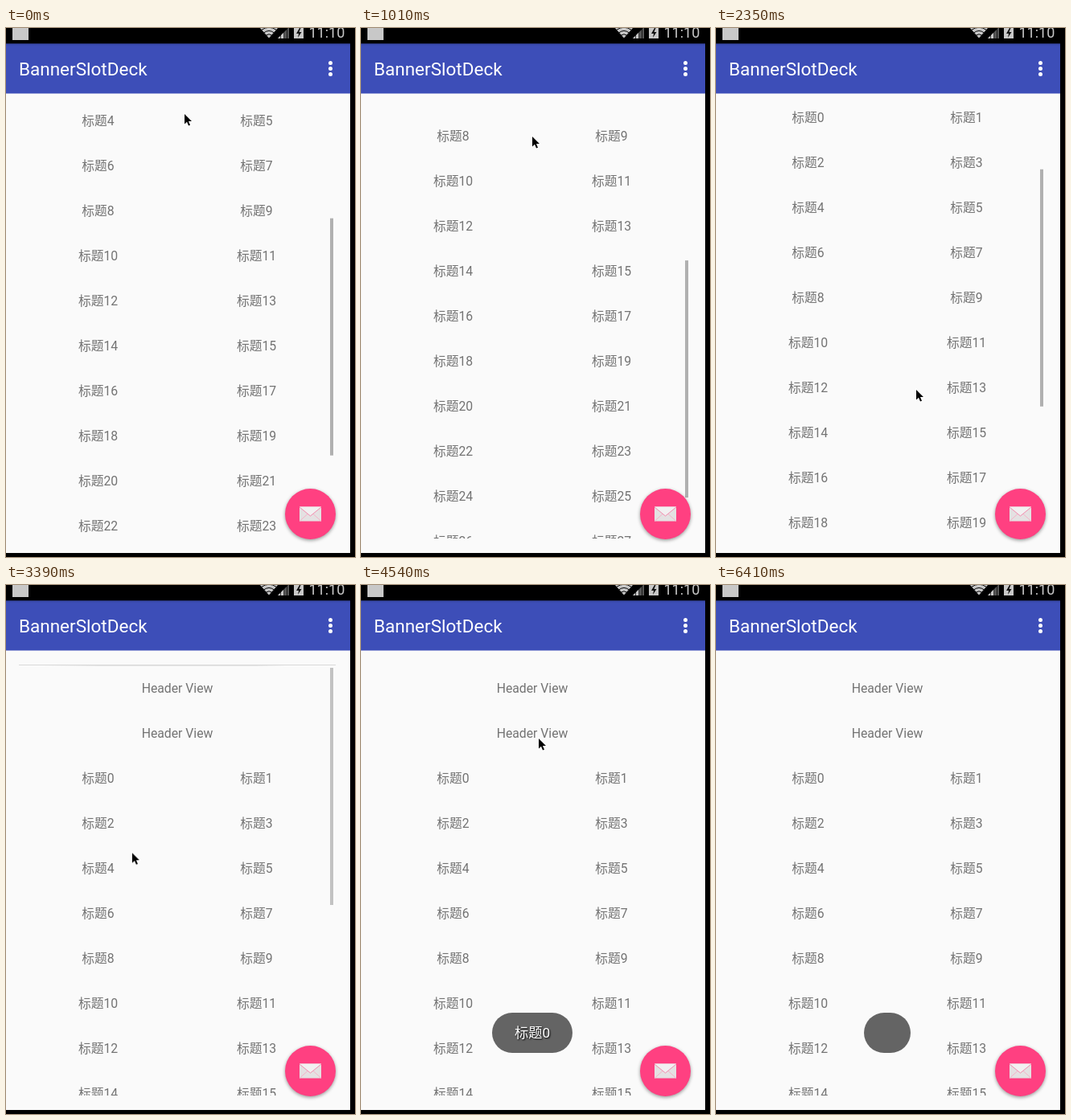
These frames come from a looping animation (434 by 658 pixels, 6.53 s). An HTML page:

```html
<!DOCTYPE html>
<html lang="zh-CN">
<head>
<meta charset="utf-8">
<title>Grid scroll</title>
<style>
@property --s { syntax: "<number>"; inherits: true; initial-value: 0; }

html, body { margin: 0; width: 100%; height: 100%; overflow: hidden; background: #000; }
body { font: 15.75px Roboto, "Noto Sans CJK SC", "Noto Sans CJK JP", sans-serif; color: #737373; }
#stage { position: relative; width: 434px; height: 658px; overflow: hidden; --loop: 6530ms linear infinite; }
#stage div, #stage svg { position: absolute; }

#page { left: 0; top: 19px; width: 428px; height: 634px; background: #fafafa; }
#appbar {
  left: 0; top: 19px; width: 412px; height: 63px; padding-left: 16px;
  background: linear-gradient(#232d6a 1px, #3848aa 1px, #3d4eb8 4px 62px, #9ca4d9 62px);
  color: #fff; font-size: 22.5px; line-height: 64px;
}
#status, #icons { left: 0; top: 0; }

#list { left: 16px; top: 99px; width: 394px; height: 536px; overflow: hidden; animation: scroll var(--loop); }
#rows { left: 0; top: 2px; width: 100%; transform: translateY(calc(var(--s) * -1px)); }
#rows div { height: 56px; line-height: 56px; text-align: center; white-space: nowrap; }
#bar {
  left: 386.5px; top: 4px; width: 4px; height: 295px; background: #b0b0b0;
  transform: translateY(calc(var(--s) * .564px)); animation: bar-fade var(--loop);
}
#glow {
  left: 0; top: 0; width: 100%; height: 2px; opacity: 0;
  background: linear-gradient(#d9d9d9, #d9d9d9) 0 0 / 100% 1px no-repeat,
    linear-gradient(90deg, transparent 8%, #e6e6e6 25% 75%, transparent 84%);
  animation: glow var(--loop);
}
.press { background: #d6d6d6; opacity: 0; height: 56px; }
#press-cell { left: 0; top: 113px; width: 197px; animation: press-cell var(--loop); }
#press-head { left: 0; top: 57px; width: 394px; animation: press-head var(--loop); }

.toast {
  top: 532px; height: 50px; border-radius: 25px; background: #646464; opacity: 0;
  color: #fff; font-size: 17.25px; line-height: 51px; text-align: center; text-shadow: 1px 1px 2px #000;
}
#toast { left: 163px; width: 100px; animation: toast var(--loop); }
#blank { left: 184px; width: 58px; animation: blank var(--loop); }

#fab {
  left: 347px; top: 572.5px; width: 63px; height: 63px; border-radius: 50%;
  background: #ff4081; box-shadow: 0 1.5px 4px rgba(0, 0, 0, .4);
}
#cursor { left: 0; top: 0; overflow: visible; animation: move var(--loop); }

@keyframes scroll {
  0%, .76% { --s: 237; }
  .77% { --s: 266; }
  1.9% { --s: 298; }
  3.06%, 11.5% { --s: 320; }
  15%, 17.9% { --s: 330; }
  19.6%, 22.36% { --s: 322; }
  25.88%, 29.56% { --s: 151; }
  32.31%, 41.35% { --s: 129; }
  43.4% { --s: 75; }
  45.4%, 100% { --s: 0; }
}
@keyframes bar-fade {
  0%, 51% { opacity: 1; }
  54.8%, 99.99% { opacity: 0; }
  100% { opacity: 1; }
}
@keyframes glow {
  0%, 46.5% { opacity: 0; }
  48.5%, 52% { opacity: 1; }
  55.4%, 100% { opacity: 0; }
}
@keyframes press-cell {
  0%, 59.7% { opacity: 0; }
  59.72%, 61.2% { opacity: 1; }
  61.22%, 100% { opacity: 0; }
}
@keyframes press-head {
  0%, 73.18% { opacity: 0; }
  73.2%, 75% { opacity: 1; }
  75.02%, 100% { opacity: 0; }
}
@keyframes toast {
  0%, 61.3% { opacity: 0; }
  64.8%, 92.1% { opacity: 1; }
  94.9%, 100% { opacity: 0; }
}
@keyframes blank {
  0%, 95% { opacity: 0; }
  98.1%, 99.99% { opacity: 1; }
  100% { opacity: 0; }
}
@keyframes move {
  0%, .76% { transform: translate(221px, 106px); }
  3.06%, 7.66% { transform: translate(221px, 103px); }
  11.5% { transform: translate(209px, 146px); }
  15%, 17.9% { transform: translate(212px, 134px); }
  19.6%, 22.36% { transform: translate(212px, 142px); }
  25.88%, 29.56% { transform: translate(245px, 427px); }
  32.31%, 36% { transform: translate(248px, 449px); }
  41.35% { transform: translate(225px, 430px); }
  45.79%, 46.55% { transform: translate(205px, 582px); }
  51.9% { transform: translate(156px, 333px); }
  55.44%, 61.3% { transform: translate(140px, 242px); }
  68.8%, 77.9% { transform: translate(220px, 190px); }
  78.71% { transform: translate(220px, 194px); }
  88.5%, 99.99% { transform: translate(368px, 662px); }
  100% { transform: translate(221px, 106px); }
}
</style>
</head>
<body>
<div id="stage">
  <div id="page"></div>
  <svg id="status" width="434" height="19">
    <rect x="8" y="-5" width="20" height="20" fill="#c8c8c8"/>
    <g fill="#c8c8c8">
      <path d="M316 0Q327 -7 338 0L327 12.5Z"/>
      <path d="M338 13L352 -1V13Z" fill="#555"/>
      <path d="M338 13L346 5V13Z"/>
      <path d="M358 0H370V13H358Z"/>
      <text x="376.5" y="12" font-size="18">11:10</text>
    </g>
    <g fill="none" stroke="#000">
      <path d="M317.5 2.5Q327 -4 336.5 2.5M320.5 6Q327 1 333.5 6M323.5 9Q327 6.5 330.5 9"/>
      <path d="M341.5 0V13M345.5 0V13M349.5 0V13" stroke-width=".7"/>
    </g>
    <path d="M365 0L361 7H364L363 12L367.5 5H364.5L366.5 0Z" fill="#111"/>
  </svg>
  <div id="appbar">BannerSlotDeck</div>
  <svg id="icons" width="428" height="82" fill="#fff">
    <circle cx="403.5" cy="43.5" r="2.5"/>
    <circle cx="403.5" cy="50.5" r="2.5"/>
    <circle cx="403.5" cy="57.5" r="2.5"/>
  </svg>
  <div id="list">
    <div class="press" id="press-cell"></div>
    <div class="press" id="press-head"></div>
    <div id="rows"></div>
    <div id="bar"></div>
    <div id="glow"></div>
  </div>
  <div id="fab">
    <svg width="63" height="63">
      <rect x="18" y="22.5" width="27" height="18" fill="#e4e1e2"/>
      <path d="M18 40.5L28 31.5M45 40.5L35 31.5" stroke="#f6b3c9"/>
      <path d="M18 22.5H45L31.5 33.5Z" fill="#f2f0f1"/>
      <path d="M18 23L31.5 34L45 23" fill="none" stroke="#f48fb1"/>
    </svg>
  </div>
  <div class="toast" id="toast">标题0</div>
  <div class="toast" id="blank"></div>
  <svg id="cursor" width="12" height="18">
    <path d="M1 1V13.5L4 10.8L6 15.6L8 14.8L6 10H10Z" stroke="#fff" stroke-width="2" paint-order="stroke"/>
  </svg>
</div>
<script>
const rows = document.getElementById("rows");

function addCell(text, row, left, width) {
  const cell = document.createElement("div");
  cell.textContent = text;
  cell.style.cssText = `left:${left}px;top:${row * 56}px;width:${width}px`;
  rows.append(cell);
}

for (let i = 0; i < 2; i++) addCell("Header View", i, 0, 394);
for (let i = 0; i < 30; i++) addCell("标题" + i, 2 + (i >> 1), (i % 2) * 197, 197);
</script>
</body>
</html>
```
